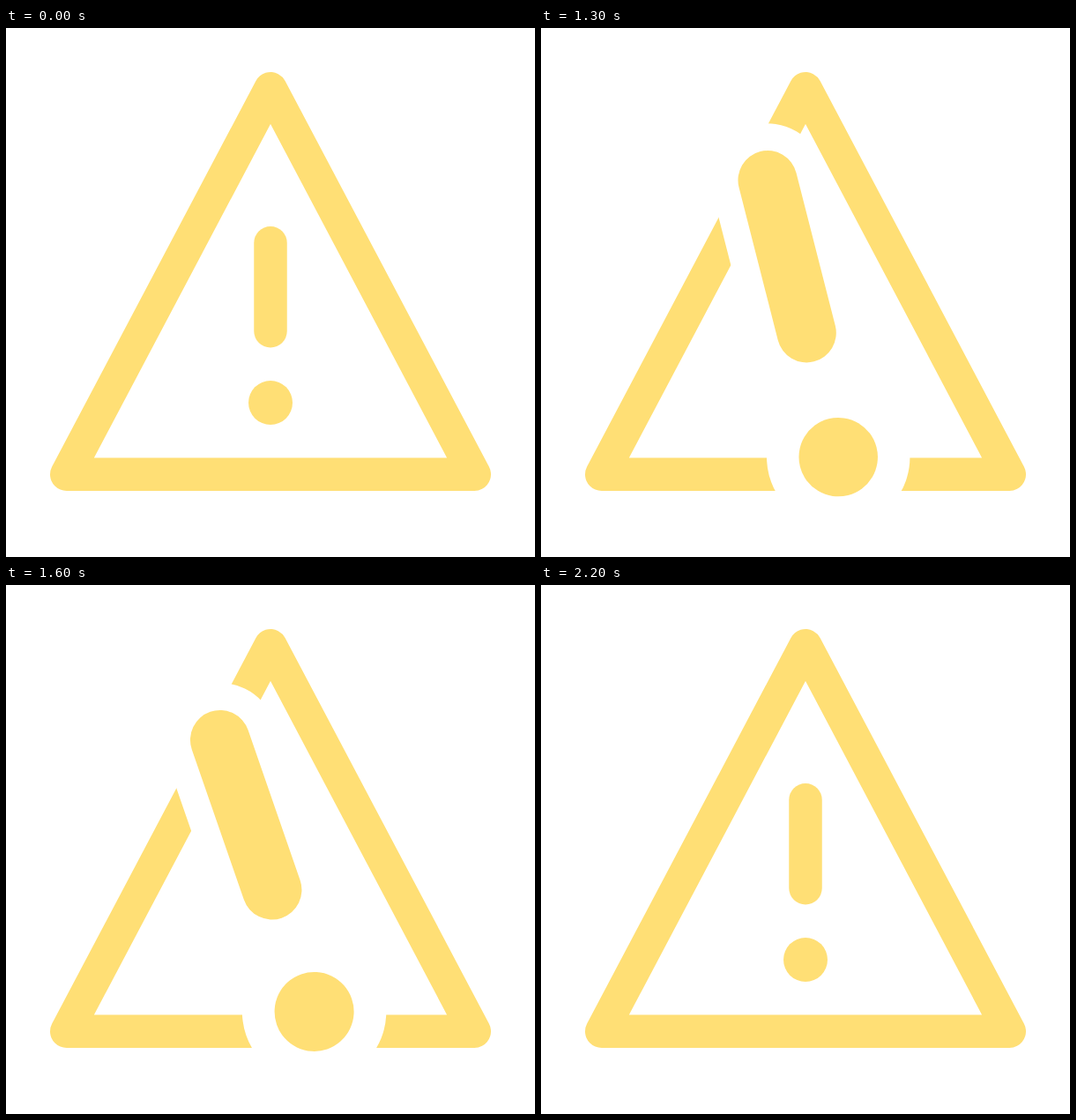
Recreate the animation shown at these times as an HTML page. Size 600 by 600 pixels, loop 2.23 s.

```html
<!DOCTYPE html>
<html lang="en">
<head>
<meta charset="utf-8">
<title>Warning sign</title>
<style>
  html, body { margin: 0; width: 100%; height: 100%; overflow: hidden; background: #fff; }
  svg { display: block; width: 100vw; height: 100vh; }
</style>
</head>
<body>
<svg viewBox="0 0 600 600" fill="none" stroke-linecap="round" stroke-linejoin="round">
  <path d="M300 68.75 531.25 506.25H68.75Z" stroke="#ffdf75" stroke-width="37.5"/>
  <g id="mark">
    <g stroke="#fff">
      <path d="M300 243.75V343.75" stroke-width="71.8"/>
      <path d="M300 425h0" stroke-width="90.8"/>
    </g>
    <g stroke="#ffdf75">
      <path d="M300 243.75V343.75" stroke-width="37.5"/>
      <path d="M300 425h0" stroke-width="50"/>
    </g>
  </g>
</svg>
<script>
const LOOP = 2230, HOLD = 1000, STEP = 30;
const PIVOT = [300, 340.9];
const mark = document.getElementById('mark');

const sine = u => (1 - Math.cos(Math.PI * u)) / 2;
const cubic = u => u < 0.5 ? 4 * u ** 3 : 1 - 4 * (1 - u) ** 3;

// Keys are [step, value]; each span is eased on its own.
const swing = [[8.3, 0], [11.8, -30], [16.4, 30], [21.4, -30], [28.7, 0]];
const zoom = [[0, 1], [11.8, 1.8], [23.5, 1.8], [40, 1]];

function valueAt(keys, n, ease) {
  if (n <= keys[0][0]) return keys[0][1];
  for (let i = 1; i < keys.length; i++) {
    const [a, from] = keys[i - 1], [b, to] = keys[i];
    if (n < b) return from + (to - from) * ease((n - a) / (b - a));
  }
  return keys[keys.length - 1][1];
}

function draw(time) {
  const n = Math.max(0, Math.floor((time % LOOP - HOLD) / STEP));
  const angle = valueAt(swing, n, sine);
  const scale = valueAt(zoom, n, cubic);
  const [x, y] = PIVOT;
  mark.setAttribute('transform',
    `translate(${x} ${y}) rotate(${angle}) scale(${scale}) translate(${-x} ${-y})`);
}

let start;
function tick(now) {
  start ??= now;
  draw(now - start);
  requestAnimationFrame(tick);
}
draw(0);
requestAnimationFrame(tick);
</script>
</body>
</html>
```
